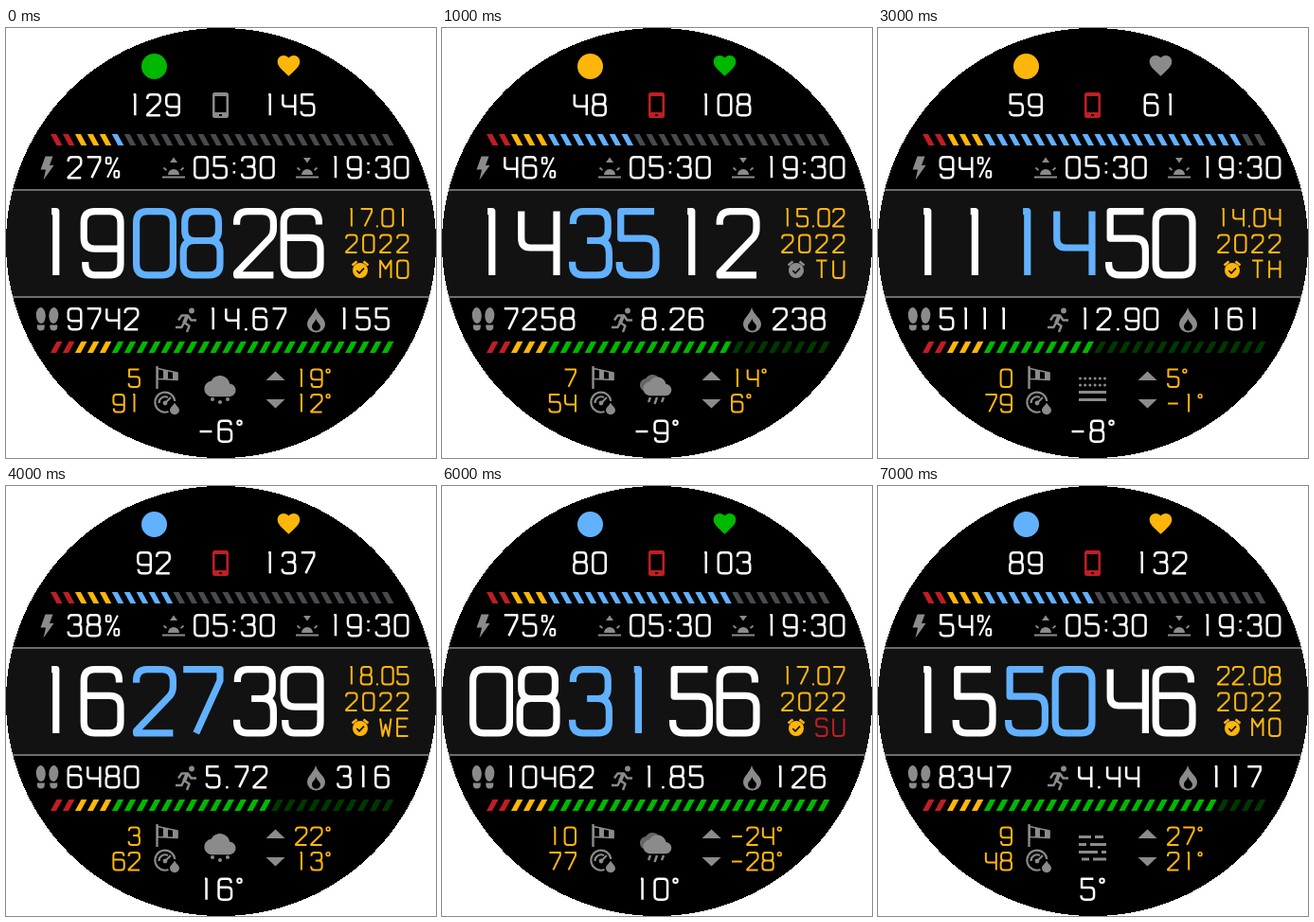
These frames come from a looping animation (454x454 px, 8 s). An HTML page with a canvas:

```html
<!DOCTYPE html>
<html lang="en">
<head>
<meta charset="utf-8">
<title>Watch face</title>
<style>
html, body { margin: 0; width: 100%; height: 100%; overflow: hidden; background: #fff; }
canvas { display: block; }
</style>
</head>
<body>
<canvas id="face" width="454" height="454"></canvas>
<script>
const ctx = document.getElementById('face').getContext('2d');
const WHITE = '#fff', YELLOW = '#ffb60a', BLUE = '#62b1ff', RED = '#c01e24',
      GREEN = '#00b800', GREY = '#8b8b8b', BLACK = '#000';

// Stroke glyphs on a 10 x 17 grid
const GLYPHS = {
  0: 'M3 0H7Q10 0 10 3V14Q10 17 7 17H3Q0 17 0 14V3Q0 0 3 0Z',
  1: 'M4 0H5.2V17',
  2: 'M0 3.6V3Q0 0 3 0H7Q10 0 10 3V4.6Q10 6 9.2 7L0 16.4V17H10',
  3: 'M.2 3.4V3Q.2 0 3 0H7Q9.7 0 9.7 3V5Q9.7 7.8 7 7.8H4M7 7.8Q10 7.8 10 11V14Q10 17 7 17H3Q0 17 0 14V13.4',
  4: 'M.4 0V7.2Q.4 9.7 2.8 9.7H10M10 0V17',
  5: 'M9.5 0H.4V7.2H7Q10 7.2 10 10.2V14Q10 17 7 17H3Q0 17 0 14V13.5',
  6: 'M9.6 3.5V3Q9.6 0 7 0H3Q0 0 0 3V14Q0 17 3 17H7Q10 17 10 14V10Q10 7 7 7H0',
  7: 'M0 0H10V3L3.5 17',
  8: 'M3 0H7Q9.6 0 9.6 3V5Q9.6 7.8 7 7.8H3Q.4 7.8 .4 5V3Q.4 0 3 0ZM3 7.8H7Q10 7.8 10 10.8V14Q10 17 7 17H3Q0 17 0 14V10.8Q0 7.8 3 7.8Z',
  9: 'M.4 13.5V14Q.4 17 3 17H7Q10 17 10 14V3Q10 0 7 0H3Q0 0 0 3V7Q0 10 3 10H10',
  '-': 'M0 8.8H9.5',
  '%': 'M1 .3H2.6Q3.6 .3 3.6 1.3V4.500Q3.6 5.500 2.6 5.500H1Q0 5.500 0 4.500V1.3Q0 .3 1 .3ZM9 .3L1 16.700M7.400 11.500H9Q10 11.500 10 12.500V15.700Q10 16.700 9 16.700H7.400Q6.400 16.700 6.400 15.700V12.500Q6.400 11.500 7.400 11.500Z',
  A: 'M0 17L4 0H6L10 17M1.6 11.500H8.4',
  E: 'M10 0H0V17H10M0 8H8.5',
  H: 'M0 0V17M10 0V17M0 8H10',
  M: 'M0 17V0L5 8L10 0V17',
  S: 'M10 3Q10 0 7 0H3Q0 0 0 3V5Q0 8 3 8H7Q10 8 10 11V14Q10 17 7 17H3Q0 17 0 14',
  T: 'M0 0H10M5 0V17',
  U: 'M0 0V14Q0 17 3 17H7Q10 17 10 14V0',
  W: 'M0 0L2.2 17L5 6L7.8 17L10 0',
};
GLYPHS.O = GLYPHS[0];

const BIG = { w: 46, h: 74.5, line: 7.2, step: 49.6 };
const TEXT = { w: 16, h: 24.4, line: 2.5, step: 20, dot: 9.8 };
const DATE = { w: 13.4, h: 20.4, line: 2, step: 15.8, dot: 6.8 };
const YEAR = { ...DATE, step: 18 };
const SMALL = { ...DATE, step: 16.2 };

const charStep = (c, f) =>
  c === '.' || c === ':' ? f.dot : c === '°' ? .4 * f.w + f.step - f.w : f.step;

function text(str, x, y, f, color, align = 0) {
  const width = [...str].reduce((sum, c) => sum + charStep(c, f), f.w - f.step);
  const { w, h, line } = f;
  x -= width * align;
  ctx.strokeStyle = ctx.fillStyle = color;
  ctx.lineJoin = 'round';
  for (const c of str) {
    const dot = at => ctx.fillRect(x + .18 * w - line / 2, y + at, line, line);
    if (c === '.') dot(h - line);
    else if (c === ':') { dot(h * .28); dot(h * .66); }
    else if (c === '°') {
      ctx.lineWidth = line * .8;
      ctx.beginPath();
      ctx.arc(x + .2 * w, y + .2 * w, .14 * w, 0, 7);
      ctx.stroke();
    } else {
      const path = new Path2D();
      path.addPath(new Path2D(GLYPHS[c]),
        new DOMMatrix([(w - line) / 10, 0, 0, (h - line) / 17, x + line / 2, y + line / 2]));
      ctx.lineWidth = c === '%' ? line * .8 : line;
      ctx.stroke(path);
    }
    x += charStep(c, f);
  }
}

function fill(d, color = GREY, x = 0, y = 0, scale = 1) {
  ctx.save();
  ctx.translate(x, y);
  ctx.scale(scale, scale);
  ctx.fillStyle = color;
  ctx.fill(new Path2D(d), 'evenodd');
  ctx.restore();
}

function line(d, width, color = GREY) {
  ctx.strokeStyle = color;
  ctx.lineWidth = width;
  ctx.stroke(new Path2D(d));
}

function disc(x, y, r, color = GREY) {
  ctx.fillStyle = color;
  ctx.beginPath();
  ctx.arc(x, y, r, 0, 7);
  ctx.fill();
}

// Round dial with a hard pixel edge
const dial = new Path2D();
for (let y = 0; y < 454; y++) {
  const half = Math.round(Math.sqrt(227 ** 2 - (y - 226.5) ** 2));
  dial.rect(227 - half, y, 2 * half, 1);
}

// 28 slanted segments: two red, three yellow, the rest in the main colour
function meter(y, lit, color, dim, lean) {
  for (let i = 0; i < 28; i++) {
    const x = 47 + i * 12.96, top = lean < 0 ? x : x + 6.5, bottom = lean < 0 ? x + 6.5 : x;
    const shades = i < 2 ? [RED, '#401012'] : i < 5 ? [YELLOW, '#4d3500'] : [color, dim];
    fill(`M${top} ${y}h6L${bottom + 6} ${y + 12}h-6Z`, shades[i < lit ? 0 : 1]);
  }
}

const HEART = 'M12 21.35l-1.45-1.32C5.4 15.36 2 12.28 2 8.5 2 5.42 4.42 3 7.5 3c1.74 0 3.41.81 4.5 2.09C13.09 3.81 14.76 3 16.5 3 19.58 3 22 5.42 22 8.5c0 3.78-3.4 6.86-8.55 11.54Z';
const CLOUD = 'M19.35 10.04C18.67 6.59 15.64 4 12 4 9.11 4 6.6 5.64 5.35 8.04 2.34 8.36 0 10.91 0 14c0 3.31 2.69 6 6 6h13c2.76 0 5-2.24 5-5 0-2.64-2.05-4.78-4.65-4.96z';

const WEATHER = {
  snow() {
    fill(CLOUD, GREY, 209.4, 361.6, 1.38);
    [[218, 392], [226, 395], [234, 392]].forEach(([x, y]) => disc(x, y, 2));
  },
  unknown() {
    fill(CLOUD, GREY, 209.2, 365, 1.39);
    ctx.fillStyle = BLACK;
    ctx.font = 'bold 18px Roboto, sans-serif';
    ctx.textAlign = 'center';
    ctx.fillText('?', 226, 389.5);
  },
  mist() {
    for (let i = 0; i < 12; i++) disc(213.5 + i % 6 * 5.2, i < 6 ? 370 : 377, 1.5);
    line('M212 384.5H241M212 392.5H241', 3);
  },
  rain() {
    fill(CLOUD, '#666', 209, 361.5, 1.1);
    fill(CLOUD, GREY, 212.5, 363.5, 1.24);
    line('M220 390l-2 5M227 390l-2.5 7M234 390l-2 5', 2.4);
  },
  fog() {
    line('M212 370.5H225M229 370.5H238M212 378.5H220M224 378.5H241M212 386.5H232M236 386.5H241M215 394H223M227 394H241', 2.8);
  },
};

function sun(x, tip) {
  fill(`M${x - 6} 155a6 6 0 0 1 12 0Z`);
  line(`M${x - 12} 157.5h24M${x - 10.5} 147.5l3 2.6M${x + 10.5} 147.5l-3 2.6`, 1.8);
  fill(tip < 0 ? `M${x - 4} 142l4-5.500 4 5.500Z` : `M${x - 4} 137l4 5.500 4-5.500Z`);
}

function foot(x, lean) {
  ctx.fillStyle = GREY;
  ctx.beginPath();
  ctx.ellipse(x, 303.5, 5, 8.4, lean, 0, 7);
  ctx.fill();
  fill(`M${x - 4} 313.500h8v2a4 4 0 0 1 -8 0Z`);
}

function staticIcons() {
  fill('M41.500 135.500H49.500L46 145H50.500L39.500 160.500 42 149.500H36.500Z');
  sun(177, -1);
  sun(318, 1);
  foot(36.8, -.06);
  foot(50.3, .06);
  disc(196, 298.5, 2.9);
  line('M182 308.500L185.500 303.500H192L195.500 308.500H201M188 311L185.500 316H179M188 311L193.500 314.500L191 321', 2.4);
  line('M191.500 303.500L188 311.500', 4);
  fill('M327 295C329 303 337 306 337 313A9.500 8.500 0 0 1 318 313C318 306 325 303 327 295ZM327.500 307C326 311 323 312 323 315.500A4.400 4 0 0 0 332 315.500C332 312 328 311 327.500 307Z');
  line('M159.500 357V381', 2.4);
  line('M160 359.500L181 364V371.500L160 370.500Z', 1.7);
  fill('M166 360.500l5 1.200v9.400l-5 -.2ZM176 363l5 1v7.500l-5 -.3Z');
  line('M171.500 405A10.500 10.500 0 1 1 178.300 394M161.500 396A6.500 6.500 0 0 1 171 390M168 396L174 390', 2.1);
  disc(168, 396, 2.4);
  fill('M178 395.500C179.500 399 183 400.500 183 403.500A5 4.700 0 0 1 173 403.500C173 400.500 176.500 399 178 395.500Z');
  fill('M274.500 372L284.500 362.500 294.500 372ZM274.500 392H294.500L284.500 401.500Z');
}

function alarm(color) {
  disc(374, 256, 8, color);
  line('M365.500 250.500L370.500 246.500M382.500 250.500L377.500 246.500', 2.4, color);
  line('M370.300 256L373 258.800 378 253.700', 1.7, '#121212');
}

const STATES = [
  { badge: GREEN, score: '129', heart: YELLOW, pulse: '145', phone: GREY, charge: 27, cells: 6,
    time: '190826', date: '17.01', day: 'MO', alarm: YELLOW, steps: '9742', goal: 28, km: '14.67',
    kcal: '155', wind: '5', humid: '91', sky: 'snow', high: '19°', low: '12°', now: '-6°' },
  { badge: YELLOW, score: '48', heart: GREEN, pulse: '108', phone: RED, charge: 46, cells: 12,
    time: '143512', date: '15.02', day: 'TU', alarm: GREY, steps: '7258', goal: 20, km: '8.26',
    kcal: '238', wind: '7', humid: '54', sky: 'rain', high: '14°', low: '6°', now: '-9°' },
  { badge: GREY, score: '15', heart: RED, pulse: '162', phone: RED, charge: 62, cells: 16,
    time: '220100', date: '23.03', day: 'WE', alarm: GREY, steps: '11371', goal: 28, km: '9.03',
    kcal: '144', wind: '1', humid: '69', sky: 'unknown', high: '8°', low: '3°', now: '19°' },
  { badge: YELLOW, score: '59', heart: GREY, pulse: '61', phone: RED, charge: 94, cells: 26,
    time: '111450', date: '14.04', day: 'TH', alarm: YELLOW, steps: '5111', goal: 14, km: '12.90',
    kcal: '161', wind: '0', humid: '79', sky: 'mist', high: '5°', low: '-1°', now: '-8°' },
  { badge: BLUE, score: '92', heart: YELLOW, pulse: '137', phone: RED, charge: 38, cells: 10,
    time: '162739', date: '18.05', day: 'WE', alarm: YELLOW, steps: '6480', goal: 18, km: '5.72',
    kcal: '316', wind: '3', humid: '62', sky: 'snow', high: '22°', low: '13°', now: '16°' },
  { badge: BLUE, score: '85', heart: GREEN, pulse: '114', phone: GREY, charge: 13, cells: 2,
    time: '081457', date: '25.06', day: 'SA', alarm: GREY, steps: '10634', goal: 20, km: '11.31',
    kcal: '462', wind: '4', humid: '39', sky: 'unknown', high: '31°', low: '26°', now: '-23°' },
  { badge: BLUE, score: '80', heart: GREEN, pulse: '103', phone: RED, charge: 75, cells: 20,
    time: '083156', date: '17.07', day: 'SU', alarm: YELLOW, steps: '10462', goal: 28, km: '1.85',
    kcal: '126', wind: '10', humid: '77', sky: 'rain', high: '-24°', low: '-28°', now: '10°' },
  { badge: BLUE, score: '89', heart: YELLOW, pulse: '132', phone: RED, charge: 54, cells: 14,
    time: '155046', date: '22.08', day: 'MO', alarm: YELLOW, steps: '8347', goal: 24, km: '4.44',
    kcal: '117', wind: '9', humid: '48', sky: 'fog', high: '27°', low: '21°', now: '5°' },
];

function draw(s) {
  ctx.clearRect(0, 0, 454, 454);
  ctx.save();
  ctx.fillStyle = BLACK;
  ctx.fill(dial);
  ctx.clip(dial);
  fill('M0 171H454V284H0Z', '#121212');
  line('M0 171H454M0 284H454', 2, '#6c6c6c');

  disc(156.5, 40.5, 13.5, s.badge);
  fill(HEART, s.heart, 284.3, 25.5, 1.18);
  fill('M220.500 68H232.500Q235 68 235 70.500V92.500Q235 95 232.500 95H220.500Q218 95 218 92.500V70.500Q218 68 220.500 68ZM220.500 72V89H232.500V72ZM225 91V93H228V91Z', s.phone);
  text(s.score, 156, 69, TEXT, WHITE, .5);
  text(s.pulse, 298.5, 69, TEXT, WHITE, .5);

  meter(112, s.cells, BLUE, '#484a4e', -1);
  text(s.charge + '%', 64.5, 135, TEXT, WHITE);
  text('05:30', 198, 135, TEXT, WHITE);
  text('19:30', 425.5, 135, TEXT, WHITE, 1);

  text(s.time.slice(0, 2), 29, 190, BIG, WHITE);
  text(s.time.slice(2, 4), 134, 190, BIG, BLUE);
  text(s.time.slice(4), 240, 190, BIG, WHITE);
  text(s.date, 425.5, 190, DATE, YELLOW, 1);
  text('2022', 425.5, 217.5, YEAR, YELLOW, 1);
  text(s.day, 425.5, 244.5, YEAR, s.day[0] === 'S' ? RED : YELLOW, 1);
  alarm(s.alarm);

  text(s.steps, 64.5, 295, TEXT, WHITE);
  text(s.km, 210.5, 295, TEXT, WHITE);
  text(s.kcal, 349, 295, TEXT, WHITE);
  meter(331, s.goal, GREEN, '#003800', 1);

  staticIcons();
  WEATHER[s.sky]();
  text(s.wind, 142, 359.5, SMALL, YELLOW, 1);
  text(s.humid, 142, 386, SMALL, YELLOW, 1);
  text(s.high, 305, 359.5, SMALL, YELLOW);
  text(s.low, 305, 386, SMALL, YELLOW);
  text(s.now, 226.5, 413.5, TEXT, WHITE, .5);
  ctx.restore();
}

let shown = -1;
function tick() {
  const index = Math.floor(performance.now() / 1000) % STATES.length;
  if (index !== shown) draw(STATES[shown = index]);
  requestAnimationFrame(tick);
}
tick();
</script>
</body>
</html>
```
